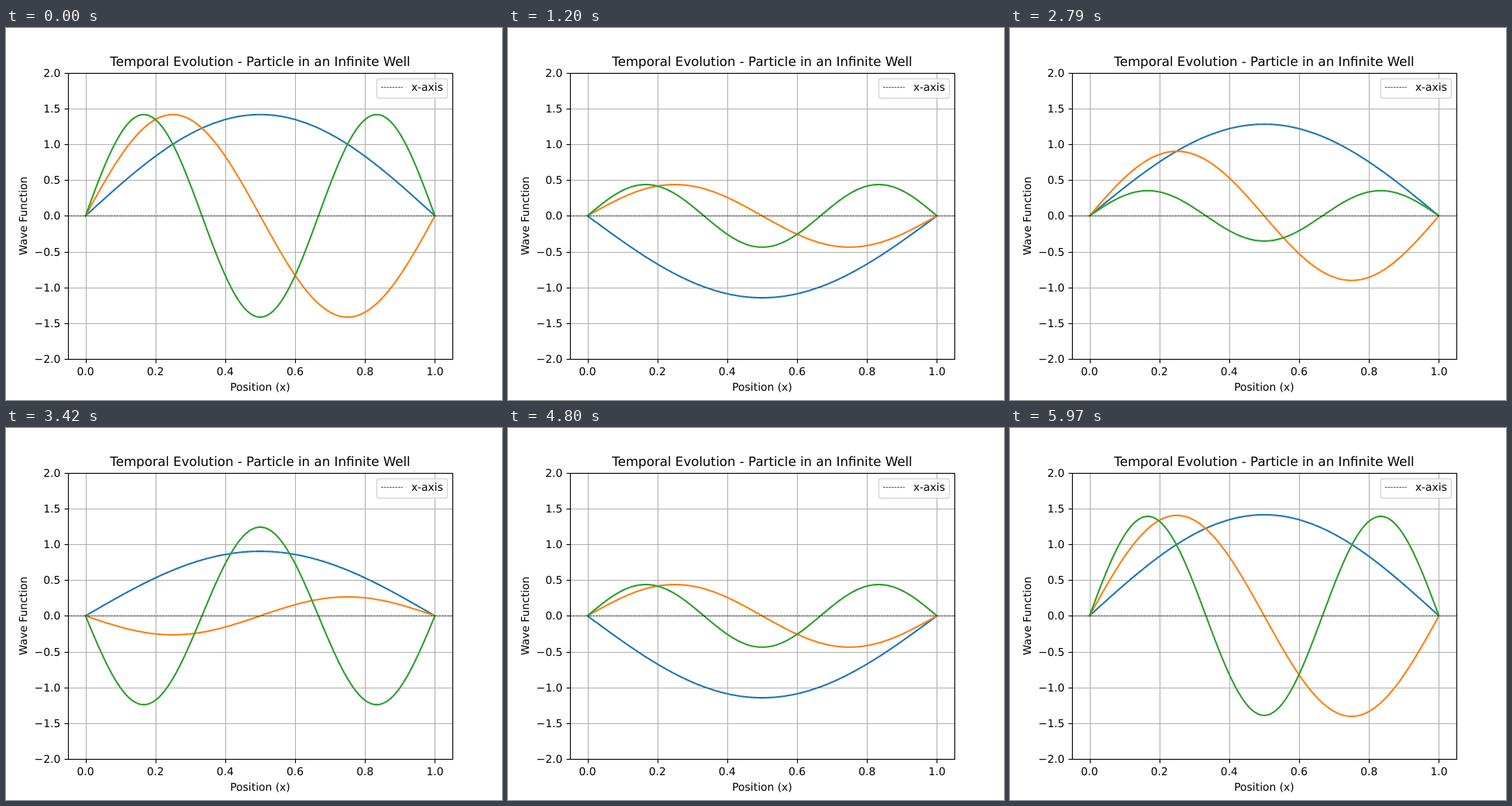
Write an HTML page that moves like this. It is 640x480 px and loops after 6 s.

```html
<!DOCTYPE html>
<html lang="en">
<head>
<meta charset="utf-8">
<title>Particle in an Infinite Well</title>
<style>
  html, body { margin: 0; width: 100%; height: 100%; overflow: hidden; background: #fff; }
  svg { display: block; width: 640px; height: 480px; }
  text { font: 13.889px "DejaVu Sans", sans-serif; text-rendering: geometricPrecision; }
  .title { font-size: 16.667px; }
  .mid { text-anchor: middle; }
  .end { text-anchor: end; }
  .grid { stroke: #b0b0b0; stroke-width: 1.11; }
  .tick { stroke: #000; stroke-width: 1.11; }
  .wave { fill: none; stroke-width: 2.083; stroke-linecap: square; stroke-linejoin: round; }
  .zero { stroke: #000; stroke-width: .694; stroke-dasharray: 2.57 1.11; }
  .frame { fill: none; stroke: #000; stroke-width: 1.11; }
  .legend { fill: #fff; stroke: #ccc; stroke-width: 1.39; fill-opacity: .8; stroke-opacity: .8; }
</style>
</head>
<body>
<svg id="plot" viewBox="0 0 640 480"></svg>
<script>
const plot = document.getElementById("plot");
const LEFT = 80, RIGHT = 576, TOP = 57.6, BOTTOM = 427.2;
const X0 = 102.545, SPAN = 450.909, Y0 = 242.4, UNIT = 92.4;
const STEP = 30, PERIOD = 3000, POINTS = 300;

const px = x => X0 + SPAN * x;
const py = y => Y0 - UNIT * y;
const snap = v => Math.floor(v + 0.5) + 0.5;

function add(tag, attrs, content) {
  const el = document.createElementNS("http://www.w3.org/2000/svg", tag);
  for (const key in attrs) el.setAttribute(key, attrs[key]);
  if (content) el.textContent = content;
  return plot.appendChild(el);
}
const line = (cls, x1, y1, x2, y2) => add("line", { class: cls, x1, y1, x2, y2 });
const label = (cls, x, y, content) => add("text", { class: cls, x, y }, content);

const xTicks = Array.from({ length: 6 }, (_, i) => i / 5);
const yTicks = Array.from({ length: 9 }, (_, i) => i / 2 - 2);

for (const v of xTicks) line("grid", snap(px(v)), TOP, snap(px(v)), BOTTOM);
for (const v of yTicks) line("grid", LEFT, snap(py(v)), RIGHT, snap(py(v)));

for (const v of xTicks) {
  const x = snap(px(v));
  line("tick", x, 427.5, x, 432.5);
  label("mid", px(v), 448, v.toFixed(1));
}
for (const v of yTicks) {
  const y = snap(py(v));
  line("tick", 75.5, y, 80.5, y);
  label("end", 70.3, Math.round(py(v) + 5), v.toFixed(1).replace("-", "\u2212"));
}

const waves = ["#1f77b4", "#ff7f0e", "#2ca02c"].map((stroke, i) => ({
  n: i + 1,
  path: add("path", { class: "wave", stroke })
}));

line("zero", LEFT, 242.5, RIGHT, 242.5);
add("rect", { class: "frame", x: 80.5, y: 58.5, width: 496, height: 369 });

label("title mid", 328, 49, "Temporal Evolution - Particle in an Infinite Well");
label("mid", 328, 468, "Position (x)");
add("text", { class: "mid", transform: "translate(27 242.4) rotate(-90)" }, "Wave Function");

add("rect", { class: "legend", x: 478.5, y: 65.5, width: 91, height: 25, rx: 2.78 });
line("zero", 484, 76.5, 511.8, 76.5);
label("", 522.9, 81, "x-axis");

// Each standing wave oscillates n times per period.
function wavePath(n, phase) {
  const amp = Math.SQRT2 * Math.cos(n * phase);
  let d = "";
  for (let i = 0; i <= POINTS; i++) {
    const x = i / POINTS;
    const y = amp * Math.sin(n * Math.PI * x);
    d += (i ? "L" : "M") + px(x).toFixed(2) + " " + py(y).toFixed(2);
  }
  return d;
}

function draw(time) {
  const t = Math.floor(time / STEP) * STEP % PERIOD;
  const phase = 2 * Math.PI * t / PERIOD;
  for (const { n, path } of waves) path.setAttribute("d", wavePath(n, phase));
}

function tick() {
  draw(performance.now() - start);
  requestAnimationFrame(tick);
}

const start = performance.now();
tick();
</script>
</body>
</html>
```
